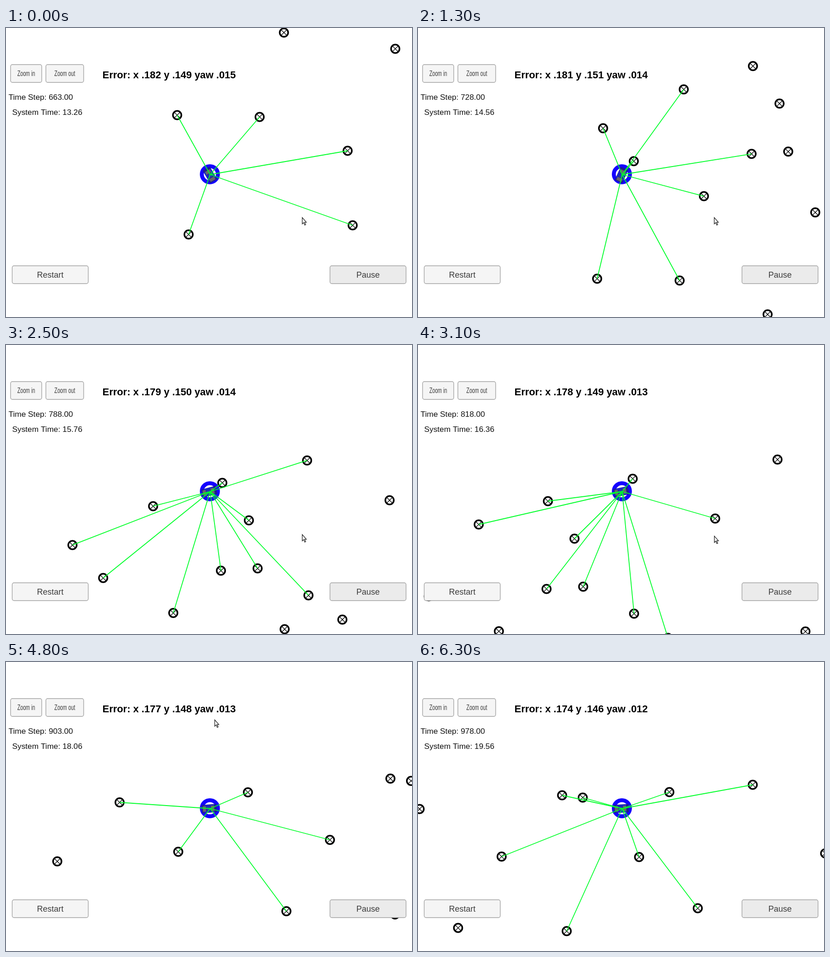
Animation of 886x632 px, one loop 6400 ms. Source, as an HTML page with a canvas:

```html
<!DOCTYPE html>
<html>
<head>
<meta charset="utf-8">
<style>
html, body { margin: 0; width: 100%; height: 100%; overflow: hidden; background: #fff; }
canvas { display: block; }
</style>
</head>
<body>
<canvas id="stage" width="886" height="632"></canvas>
<script>
const ctx = document.getElementById('stage').getContext('2d');
const SANS = '"Liberation Sans", Arial, sans-serif';
const LOOP = 6400, STEP = 100, SENSOR_RANGE = 340;
const CAR = { x: 445, y: 320 };
const arrow = new Path2D('M.5 .5V14.5L3.5 11.5L6 17L8 16L5.7 10.8H9.5Z');

// The map: landmark positions at the start of the loop
const landmarks = [
  [606, 9.5], [849, 45], [373, 190], [553, 194], [745, 268], [756, 431], [398, 451],
  [386, -139], [453, -67], [710, -83], [790, -88],
  [562, -224], [713, -275], [771, -193], [898, -324], [901, -29], [921, 96], [975, 24],
  [1214, -366], [1078, -237], [1275, 10], [1342, -258], [1494, -388], [1578, -128],
  [1673, -284], [1805, -418], [1850, -413], [1815, -121],
  [2039, -425], [2221, -441], [1973, -283], [2101, -171], [2379, -291]
];

// Waypoints of the drive: time, scroll x, scroll y
const route = [
  [0, 0, 0], [600, 55, 157], [1900, -83, 502], [3100, -430, 616],
  [4100, -742, 654], [4800, -966.6, 672.5], [6300, -1491, 709]
];

const clamp = u => Math.max(0, Math.min(1, u));
const smooth = u => u * u * (3 - 2 * u);

// Velocity of a parabola through three neighbouring waypoints
function velocity(k, axis, t) {
  const i = Math.max(1, Math.min(route.length - 2, k));
  const [a, b, c] = [route[i - 1], route[i], route[i + 1]];
  const ab = (b[axis] - a[axis]) / (b[0] - a[0]);
  const bc = (c[axis] - b[axis]) / (c[0] - b[0]);
  return ab + (bc - ab) * (2 * t - a[0] - b[0]) / (c[0] - a[0]);
}

function scrollAt(t) {
  let k = 0;
  while (k < route.length - 2 && t >= route[k + 1][0]) k++;
  const p = route[k], q = route[k + 1], dt = q[0] - p[0];
  const u = (t - p[0]) / dt, v = 1 - u;
  return [1, 2].map(axis =>
    p[axis] + (q[axis] - p[axis]) * smooth(u) +
    dt * u * v * (velocity(k, axis, p[0]) * v - velocity(k + 1, axis, q[0]) * u));
}

function line(x1, y1, x2, y2, color, width) {
  ctx.strokeStyle = color;
  ctx.lineWidth = width;
  ctx.beginPath();
  ctx.moveTo(x1, y1);
  ctx.lineTo(x2, y2);
  ctx.stroke();
}

function ring(x, y, r, color, width) {
  ctx.strokeStyle = color;
  ctx.lineWidth = width;
  ctx.beginPath();
  ctx.arc(x, y, r, 0, 7);
  ctx.stroke();
}

function rect(x, y, w, h, color) {
  ctx.fillStyle = color;
  ctx.fillRect(x, y, w, h);
}

function text(str, x, y, font, color = '#111', align = 'left') {
  ctx.font = `${font} ${SANS}`;
  ctx.fillStyle = color;
  ctx.textAlign = align;
  ctx.fillText(str, x, y);
}

function button(label, x, y, w, fill, size, narrow = 1) {
  ctx.beginPath();
  ctx.roundRect(x, y, w, 39, 4);
  ctx.fillStyle = fill;
  ctx.fill();
  ctx.strokeStyle = '#a3a3a3';
  ctx.lineWidth = 1.4;
  ctx.stroke();
  ctx.save();
  ctx.translate(x + w / 2, y + 19.5 + size * .35);
  ctx.scale(narrow, 1);
  text(label, 0, 0, size + 'px', '#3c3c3c', 'center');
  ctx.restore();
}

function drawCar(t) {
  const [x0, y0] = scrollAt(t), [x1, y1] = scrollAt(t + 20);
  ctx.save();
  ctx.translate(CAR.x - 1, CAR.y);
  ctx.rotate(Math.atan2(y0 - y1, x0 - x1));
  rect(-17, -9, 32, 18, '#1c1f8c');
  for (const side of [-8, 5]) rect(-12, side, 22, 3, '#1726d8');
  for (const end of [-15, 3]) rect(end, -6, 7, 12, '#66666a');
  rect(-7, -4, 9, 8, '#2438b4');
  ctx.restore();
}

function drawWorld(t) {
  const [sx, sy] = scrollAt(t);
  const visible = landmarks.map(([x, y]) => [x + sx, y + sy]);
  ctx.save();
  ctx.translate(.5, .5);
  for (const [x, y] of visible) {
    ring(x, y, 9.2, '#000', 3.5);
    for (const d of [-5.5, 5.5]) line(x - 5.5, y - d, x + 5.5, y + d, '#000', 1.3);
  }
  ring(CAR.x - .6, CAR.y - .7, 17.6, '#1400ff', 8.6);
  drawCar(t);
  for (const [x, y] of visible)
    if (Math.hypot(x - CAR.x, y - CAR.y) < SENSOR_RANGE)
      line(CAR.x, CAR.y, x, y, '#00ff2a', 1.8);
  ctx.restore();
}

// The pointer rests, drops down, then leaves through the top
function drawPointer(t) {
  const drop = smooth(clamp((t - 3050) / 600));
  const leave = Math.max(0, (t - 4180) / 620);
  ctx.save();
  ctx.translate(646 + 10 * drop - 201 * leave, 414 + 171 * drop - 459 * leave);
  ctx.fillStyle = '#fff';
  ctx.fill(arrow);
  ctx.strokeStyle = '#222';
  ctx.lineWidth = 1.3;
  ctx.stroke(arrow);
  ctx.restore();
}

function drawReadouts(t) {
  const step = 663 + t / 20;
  const decimal = n => n.toFixed(3).slice(1);
  const x = decimal(.18249 - 1.3e-6 * t - .0003 * Math.sin(t / 1000));
  const y = decimal(Math.min(.149 + 3.3e-6 * t, .15249 - .97e-6 * t));
  const yaw = decimal(.0149 - 4.6e-7 * t);
  text(`Error: x ${x} y ${y} yaw ${yaw}`, 210.6, 109.7, 'bold 21.9px', '#000');
  text('Time Step: ' + step.toFixed(2), 5.5, 156.7, '17.3px');
  text('System Time: ' + (step * .02).toFixed(2), 13.5, 190.2, '17.3px');
}

function draw(t) {
  rect(0, 0, 886, 632, '#fff');
  drawWorld(t);
  drawReadouts(t);
  button('Zoom in', 10, 80, 68, '#f5f5f5', 16, .67);
  button('Zoom out', 87, 80, 82.5, '#f5f5f5', 16, .67);
  button('Restart', 13.5, 520, 166, '#f5f5f5', 18);
  button('Pause', 707, 520, 166, '#ebebeb', 18);
  drawPointer(t);
}

function tick() {
  draw(Math.floor(performance.now() % LOOP / STEP) * STEP);
  requestAnimationFrame(tick);
}
tick();
</script>
</body>
</html>
```
